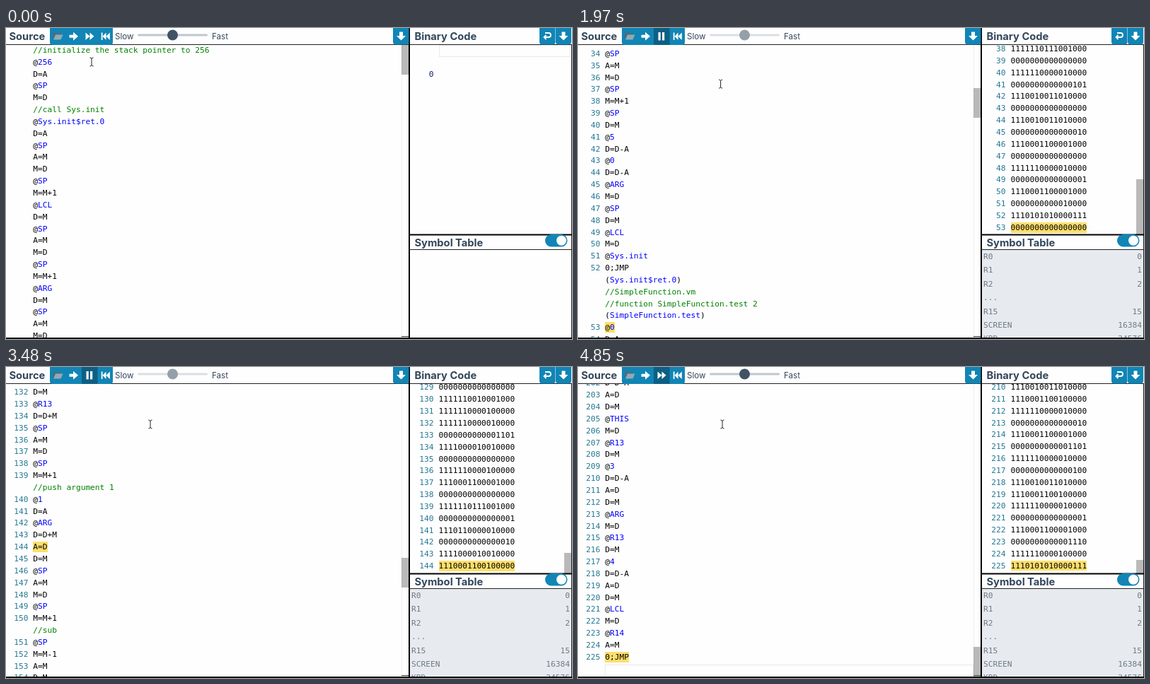
Write an HTML page that moves like this. It is 800 px wide and 440 px high and loops after 4.88 s.

```html
<!DOCTYPE html>
<html lang="en">
<head>
<meta charset="utf-8">
<title>Assembler</title>
<style>
  html, body { margin: 0; width: 100%; height: 100%; overflow: hidden; background: #fff; }
  #stage { position: relative; width: 800px; height: 440px; overflow: hidden; background: #fefefe; }
  #stage > * { position: absolute; }
  .pane { overflow: hidden; font: 11.2px/16.85px "DejaVu Sans Mono", monospace; white-space: pre; color: #000; }
  .list { position: absolute; left: 0; right: 0; top: 0; overflow: hidden; }
  .row { height: 16.85px; }
  .row i { display: inline-block; font-style: normal; text-align: right; color: #237893; }
  .row .on { background: #ffdf6b; padding: .8px 0; }
  .note { color: #008000; }
  .name { color: #0000ff; }
  .active { position: absolute; box-sizing: border-box; height: 16.85px; border: 1px solid #e9e9e9; }
  .thumb { position: absolute; width: 10px; background: rgba(100, 100, 100, .45); }
  #editor { left: 0; top: 23.9px; width: 569px; height: 414px; }
  #editor i { width: 31.5px; margin-right: 6.8px; }
  #editor .ruler { position: absolute; left: 559px; top: 0; width: 9px; height: 414px; border-left: 1px solid #eee; }
  #editor .mark { position: absolute; left: 559px; top: 412px; width: 10px; height: 1.5px; background: #333; }
  #binary { left: 572px; top: 23.9px; width: 227px; height: 268px; }
  #binary i { width: 32.5px; margin-right: 7px; }
  #symbols { left: 571px; top: 314px; width: 228px; height: 124px; background: #e7ebef; color: #6f7a86; line-height: 19.4px; }
  #symbols div { display: flex; justify-content: space-between; padding: 0 2px; }
  #tip { left: 118px; top: 26px; transform: translateX(-50%); padding: 0 7px; border-radius: 4px;
         background: #18232c; color: #fff; font: 13px/22px Inter, sans-serif; }
  #tip::before { content: ""; position: absolute; left: 50%; top: -4px; margin-left: -4px;
                 border: 4px solid transparent; border-top: 0; border-bottom-color: #18232c; }
  svg text { fill: #33475b; font-family: Inter, sans-serif; }
  .title { font-size: 14.7px; font-weight: 700; }
  .label { font-size: 11.6px; }
  .idle #editor i, .idle #symbols, .idle #code { visibility: hidden; }
  .started #blank { visibility: hidden; }
  .running #slider { opacity: .55; }
  .running #play, #pause { display: none; }
  .running #pause { display: inline; }
</style>
</head>
<body>
<div id="stage">
  <div id="editor" class="pane">
    <div class="ruler"></div><div class="mark"></div>
    <div class="list" id="asm"></div>
    <div class="thumb" id="asmThumb" style="left:559px;height:42px"></div>
  </div>
  <div id="binary" class="pane">
    <div id="blank"><div class="row"><i style="color:#0b216f">0</i></div><div class="active" style="left:39.5px;right:1px;top:0"></div></div>
    <div class="list" id="code"></div>
    <div class="thumb" id="codeThumb" style="left:216.5px"></div>
  </div>
  <div id="symbols" class="pane"></div>
  <svg width="800" height="440" style="left:0;top:0">
    <path d="M0 0h800v23h-800zM571 293h229v20h-229z" fill="#fefefe"/>
    <path d="M0 23.5h800M571 313.5h229M799.5 24v415" stroke="#222"/>
    <path d="M570 0v440M571 292.5h229M0 439h800" stroke="#000" stroke-width="2"/>
    <g class="title"><text x="4.5" y="17">Source</text><text x="577.5" y="17">Binary Code</text><text x="577.5" y="309">Symbol Table</text></g>
    <g class="label"><text x="154" y="16">Slow</text><text x="291" y="16">Fast</text></g>
    <g id="slider">
      <rect x="186" y="8.5" width="99" height="3" rx="1.5" fill="#bfc7d0"/>
      <circle cx="235.5" cy="10" r="7.5" fill="#415265"/>
    </g>
    <g fill="#1185b5">
      <rect x="62" y="-3" width="89" height="27" rx="4"/>
      <rect x="547" y="-3" width="22.5" height="26.5" rx="4"/>
      <rect x="754" y="-3" width="22.5" height="26.5" rx="4"/>
      <rect x="777" y="-3" width="22" height="26.5" rx="4"/>
      <rect x="762" y="292" width="31.5" height="17.5" rx="8.75"/>
    </g>
    <rect id="focus" x="107" y="0" width="22.5" height="24" fill="#0e5f84"/>
    <path d="M66.5 16.5V6h4.5l1 1.5h6V9H70z" fill="#4f6b7b"/>
    <path d="M67 16.5L70 9.5h10.500l-3 7z" fill="#93a9b3"/>
    <g fill="#fff">
      <path d="M89.5 9.8h5.5v-4l7 6-7 6v-4h-5.5z"/>
      <path id="play" d="M112.5 6.5l6 5.3-6 5.3zM118.5 6.5l6 5.3-6 5.3z"/>
      <path id="pause" d="M113.5 6h3.2v11.500h-3.200zM119 6h3.2v11.500h-3.200z"/>
      <path d="M134.7 6.5h1.8v10.600h-1.800zM141.5 6.5v10.600l-5-5.300zM146.8 6.5v10.600l-5.300-5.300z"/>
      <path id="down" d="M556 5.5h5v5.500h4l-6.500 6.500-6.500-6.500h4z"/>
      <use href="#down" x="229.5"/>
      <circle cx="785" cy="300.7" r="7"/>
    </g>
    <path d="M760.5 13h6.500a3 3 0 0 0 0-6h-5M763.5 10l-3 3 3 3" fill="none" stroke="#fff" stroke-width="1.8"/>
  </svg>
  <div id="tip"></div>
  <svg width="800" height="440" style="left:0;top:0">
    <g id="cursor">
      <path id="beam" d="M-2.5-6q2 0 2.500 1.500q.5-1.500 2.500-1.500M0-5v10M-2.500 6q2 0 2.500-1.500q.5 1.500 2.500 1.500" fill="none" stroke="#222"/>
      <path id="hand" d="M-1 1q1-1.500 2 0v4l4.500 1q1.200.5 1 2l-1 4.500h-6l-3.500-4.500q-.5-1.500 1-1l2 1.200z" fill="#fff" stroke="#111" stroke-width=".9"/>
    </g>
  </svg>
</div>
<script>
const $ = id => document.getElementById(id);
const clamp = x => Math.min(1, Math.max(0, x));
const LOOP = 4880, ROW = 16.85, PAGE = 268, MAX_SCROLL = 3663.6, LAST = 225;

// The program, written by a small VM translator
const lines = [];
const asm = text => lines.push(...text.split(' '));
const note = text => lines.push('//' + text);
const PUSH = '@SP A=M M=D @SP M=M+1', POP = '@SP M=M-1 A=M D=M';
const pushVar = (segment, base, i) => {
  note(`push ${segment} ${i}`);
  asm(`@${i} D=A @${base} D=D+M A=D D=M ${PUSH}`);
};
const binaryOp = (name, sign) => {
  note(name);
  asm(`${POP} @R13 M=D ${POP} @R13 D=D${sign}M @SP A=M M=D @SP M=M+1`);
};

note('initialize the stack pointer to 256');
asm('@256 D=A @SP M=D');
note('call Sys.init');
asm(`@Sys.init$ret.0 D=A ${PUSH}`);
for (const base of ['LCL', 'ARG', 'THIS', 'THAT']) asm(`@${base} D=M ${PUSH}`);
asm('@SP D=M @5 D=D-A @0 D=D-A @ARG M=D @SP D=M @LCL M=D @Sys.init 0;JMP (Sys.init$ret.0)');
note('SimpleFunction.vm');
note('function SimpleFunction.test 2');
asm(`(SimpleFunction.test) @0 D=A ${PUSH} @0 D=A ${PUSH}`);
pushVar('local', 'LCL', 0);
pushVar('local', 'LCL', 1);
binaryOp('add', '+');
note('not');
asm('@SP M=M-1 A=M M=!M @SP M=M+1');
pushVar('argument', 'ARG', 0);
binaryOp('add', '+');
pushVar('argument', 'ARG', 1);
binaryOp('sub', '-');
note('return');
asm(`@LCL D=M @R13 M=D @5 D=A @R13 A=M A=A-D D=M @R14 M=D ${POP} @ARG A=M M=D @ARG D=M @SP M=D+1`);
['THAT', 'THIS', 'ARG', 'LCL'].forEach((base, i) => asm(`@R13 D=M @${i + 1} D=D-A A=D D=M @${base} M=D`));
asm('@R14 A=M 0;JMP');

// Assembler
const symbols = { SP: 0, LCL: 1, ARG: 2, THIS: 3, THAT: 4, R13: 13, R14: 14, 'Sys.init': 16, 'Sys.init$ret.0': 53 };
const comps = {
  '0': '0101010', 'A': '0110000', 'M': '1110000', 'D': '0001100', '!M': '1110001', 'M+1': '1110111', 'M-1': '1110010',
  'D+1': '0011111', 'D-A': '0010011', 'A-D': '0000111', 'D+M': '1000010', 'D-M': '1010011'
};
function assemble(line) {
  if (line[0] === '@') {
    const name = line.slice(1);
    return (symbols[name] ?? +name).toString(2).padStart(16, '0');
  }
  if (line === '0;JMP') return '111' + comps[0] + '000111';
  const [dest, comp] = line.split('=');
  return '111' + comps[comp] + [...'ADM'].map(r => +dest.includes(r)).join('') + '000';
}

const isCode = line => !/^[/(]/.test(line);
const row = (number, html) => `<div class="row"><i>${number}</i><span>${html}</span></div>`;
const colour = line => line.startsWith('//')
  ? `<span class="note">${line}</span>`
  : line.replace(/^([@(])([^)]+)/, '$1<span class="name">$2</span>');

const lineOf = [];
lines.forEach((line, i) => isCode(line) && lineOf.push(i));
let count = 0;
$('asm').innerHTML = lines.map(line => row(isCode(line) ? count++ : '', colour(line))).join('') +
  `<div class="row"></div><div class="active" style="left:38px;width:521px;top:${lines.length * ROW}px"></div>`;
$('code').innerHTML = lineOf.map((at, n) => row(n, assemble(lines[at]))).join('');
$('symbols').innerHTML = [['R0', 0], ['R1', 1], ['R2', 2], ['...', ''], ['R15', 15], ['SCREEN', 16384], ['KBD', 24576]]
  .map(([name, value]) => `<div><span>${name}</span><span>${value}</span></div>`).join('');

const asmRows = [...document.querySelectorAll('#asm .row > i + span')];
const codeRows = [...document.querySelectorAll('#code .row > i + span')];

const ease = x => x < .5 ? 4 * x ** 3 : 1 - 4 * (1 - x) ** 3;
function cursorAt(t) {
  const up = ease(clamp((t - 30) / 420)), away = ease(clamp((t - 1600) / 460));
  return [121 + 83 * away, 48 - 30.5 * up + 63.5 * away];
}

let marked = [];
function draw(now) {
  const t = now % LOOP;
  const n = Math.min(LAST, Math.floor((t - 1970) * .06 + 53.8));
  const started = n >= 0, running = started && n < LAST;
  $('stage').className = (started ? 'started' : 'idle') + (running ? ' running' : '');

  marked.forEach(el => el.classList.remove('on'));
  marked = started ? [asmRows[lineOf[n]], codeRows[n]] : [];
  marked.forEach(el => el.classList.add('on'));

  // The editor recentres by twelve lines whenever the marked line leaves the view
  const line = started ? lineOf[n] : 0;
  const scroll = line < 24 ? 0 : Math.min(MAX_SCROLL, 12 * (Math.floor(line / 12) - 1) * ROW - 5.2);
  $('asm').style.top = -scroll + 'px';
  $('asmThumb').style.top = scroll * .1017 + 'px';
  $('asmThumb').style.opacity = t < 1440 ? 1 - clamp((t - 700) / 800) : clamp((t - 1440) / 100);

  const height = (n + 1) * ROW, thumb = Math.min(PAGE, PAGE * PAGE / (Math.max(0, height) + 8));
  $('code').style.height = Math.max(0, height) + 'px';
  $('code').style.top = Math.min(0, PAGE - height) + 'px';
  $('codeThumb').style.height = thumb + 'px';
  $('codeThumb').style.top = PAGE - thumb + 'px';
  $('codeThumb').style.opacity = clamp((t - 1323) / 100);

  const [x, y] = cursorAt(t), hover = y < 24;
  $('cursor').setAttribute('transform', `translate(${x} ${y})`);
  $('hand').style.display = $('tip').style.display = hover ? '' : 'none';
  $('beam').style.display = hover ? 'none' : '';
  $('focus').style.display = hover || started ? '' : 'none';
  $('tip').textContent = running ? 'Pause' : 'Play';
  requestAnimationFrame(draw);
}
requestAnimationFrame(draw);
</script>
</body>
</html>
```
